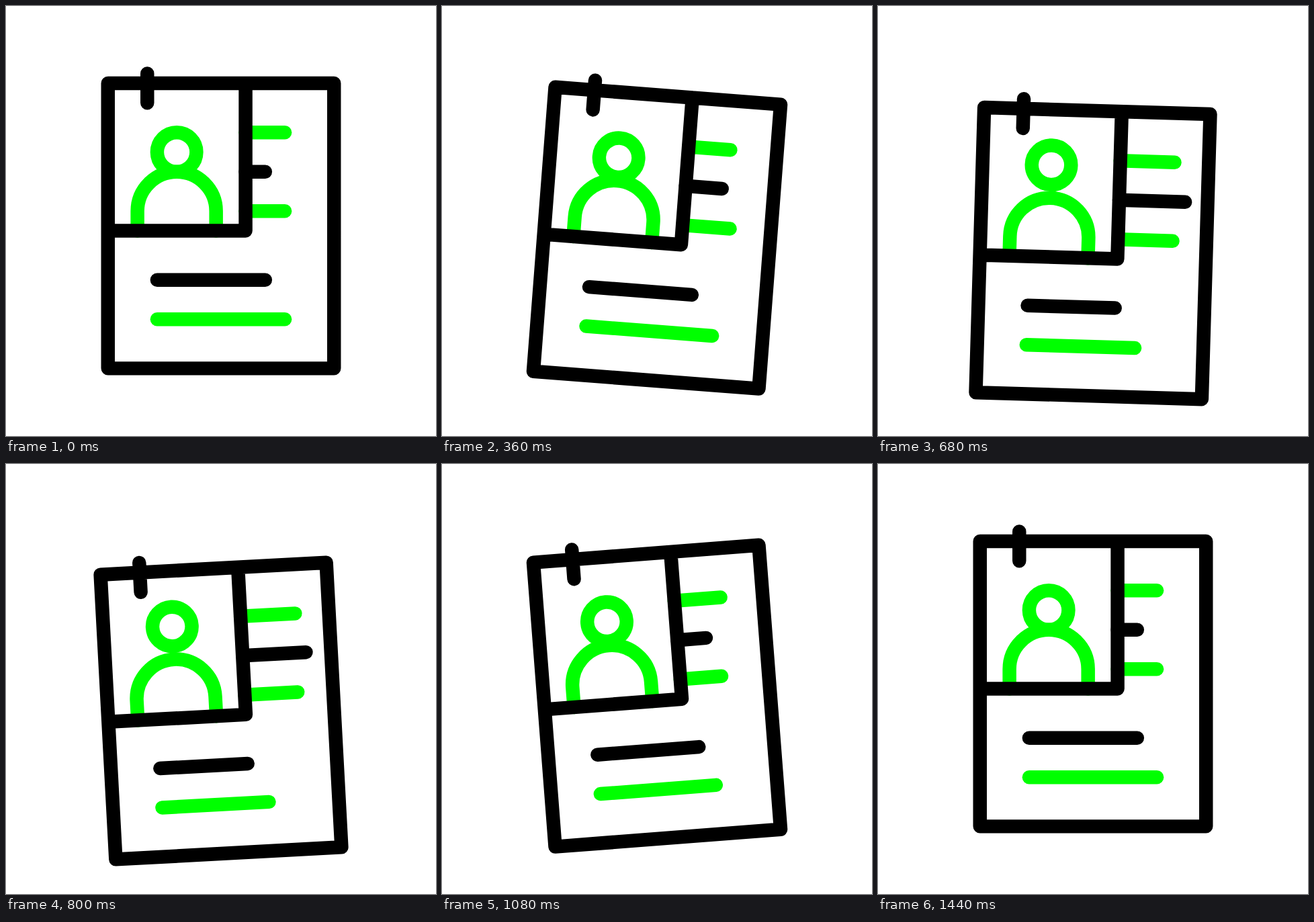
An HTML page that plays this animation: 640x640 px, repeating every 1480 ms.

```html
<!DOCTYPE html>
<html lang="en">
<head>
<meta charset="utf-8">
<title>Resume icon</title>
<style>
  html, body { margin: 0; width: 100%; height: 100%; overflow: hidden; background: #fff; }
  svg { display: block; width: 100vw; height: 100vh; }
</style>
</head>
<body>
<svg viewBox="0 0 640 640">
  <g id="card">
    <!-- one unit is 1/23 of the sheet's width -->
    <g transform="translate(151.75 115.1) scale(14.63)" fill="none" stroke="#000"
       stroke-width="1.4" stroke-linecap="round" stroke-linejoin="round">
      <path id="a" stroke="#0f0"/>
      <path id="b"/>
      <path id="c" stroke="#0f0"/>
      <path id="d"/>
      <path id="e" stroke="#0f0"/>
      <circle id="head" cx="7" cy="7" r="2" stroke="#0f0"/>
      <path d="M3 15V13a4 4 0 0 1 8 0V15" stroke="#0f0"/>
      <path d="M0 0H23V29H0ZM0 15H14V0M4 -1V2"/>
    </g>
  </g>
</svg>
<script>
const STEP = 40, LOOP = 1480, UNIT = 14.63;
const CX = 320, CY = 327.25;
const $ = id => document.getElementById(id);

// Cubic Bezier ease (.53, 0, .47, 1), solved by bisection
function ease(x) {
  if (x <= 0) return 0;
  if (x >= 1) return 1;
  let lo = 0, hi = 1, t = 0.5;
  for (let i = 0; i < 30; i++) {
    t = (lo + hi) / 2;
    const u = 1 - t;
    if (3 * t * u * (0.53 * u + 0.47 * t) + t * t * t < x) lo = t;
    else hi = t;
  }
  return t * t * (3 - 2 * t);
}

// Eased value through [time, value] keys
function track(k, keys) {
  let v = keys[0][1];
  for (let i = 1; i < keys.length; i++) {
    const [t0, v0] = keys[i - 1], [t1, v1] = keys[i];
    v += (v1 - v0) * ease((k - t0) / (t1 - t0));
  }
  return v;
}

const bump = (k, start, peak, end, amount) =>
  track(k, [[start, 0], [peak, amount], [end, 0]]);

// Text lines: row, left, right, then the times and size (px) of the stretch
const lines = {
  a: [5, 14, 18, 4.3, 19.1, 34.3, 23],
  b: [9, 14, 16, 2.8, 17.1, 32, 69],
  c: [13, 14, 18, 1.6, 16, 31.3, 23],
  d: [20, 5, 16, 3.6, 18.2, 33, -31],
  e: [24, 5, 18, 6.1, 20, 35, -31]
};

function draw(ms) {
  const k = Math.floor((ms % LOOP) / STEP);
  const drop = bump(k, 1, 18, 35, 41.05);
  const tilt = track(k, [[1, 0], [12, 5], [24, -5], [35, 0]]);
  $("card").setAttribute("transform", `translate(0 ${drop}) rotate(${tilt} ${CX} ${CY})`);
  for (const id in lines) {
    const [y, x0, x1, ...move] = lines[id];
    $(id).setAttribute("d", `M${x0} ${y}H${x1 + bump(k, ...move) / UNIT}`);
  }
  $("head").setAttribute("cy", 7 + bump(k, 3.6, 18.2, 33, -20) / UNIT);
}

let start = null;
function tick(now) {
  if (start === null) start = now;
  draw(Math.max(0, now - start));
  requestAnimationFrame(tick);
}
draw(0);
requestAnimationFrame(tick);
</script>
</body>
</html>
```
